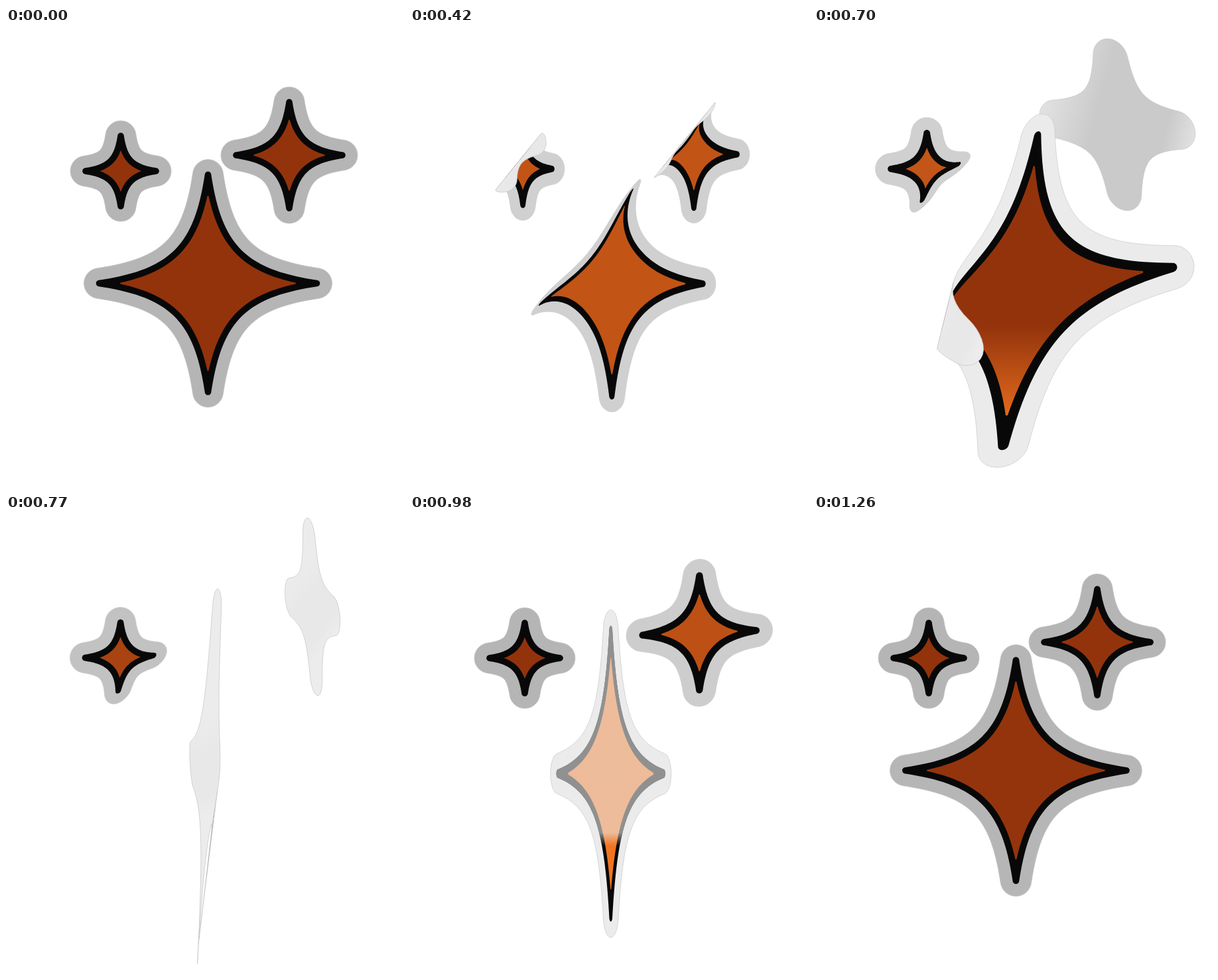
These frames come from a looping animation (600 by 693 pixels, 1330 ms). An HTML page with a canvas:

```html
<!DOCTYPE html>
<html lang="en">
<head>
<meta charset="utf-8">
<title>Sparkle stickers</title>
<style>
html, body { margin: 0; width: 100%; height: 100%; overflow: hidden; background: #fff; }
canvas { display: block; width: 600px; height: 693px; }
</style>
</head>
<body>
<canvas id="stage" width="600" height="693"></canvas>
<script>
const ctx = document.getElementById('stage').getContext('2d');
const STEP = 70, STEPS = 19, RIM = 23, INK = 4.8;
const EYE = { x: 310, y: 370 };
const lerp = (a, b, t) => a + (b - a) * t;
const clamp = v => Math.min(1, Math.max(0, v));
const grey = v => `rgb(${v},${v},${v})`;
const orange = l => `rgb(${147 + 47 * l},${51 + 33 * l},${12 + 10 * l})`;

// Keys: turn in revolutions about the upright axis, peel of a corner,
// curl of the left (+) or right (-) tip, tilt, lean and twist of the sheet.
const stars = [
  { x: 173, y: 216, size: 76, lift: 0.1, peak: 8, spread: 1.6, land: 13.2,
    keys: [
      { at: 0 },
      { at: 4, peel: 0.2 },
      { at: 6, turn: 0.1, peel: 0.45 },
      { at: 8, turn: 0.5, tilt: 0.15, curl: 0.9 },
      { at: 10, turn: 1, peel: -0.18 },
      { at: 12, turn: 1 }
    ] },
  { x: 427, y: 192, size: 103, lift: 0.3, peak: 11, spread: 2.6, land: 17,
    keys: [
      { at: 0 },
      { at: 4, peel: 0.02 },
      { at: 6, turn: 0.1, peel: 0.3 },
      { at: 8, turn: 0.4, tilt: 0.13, lean: -0.07, twist: 0.12, curl: -0.45 },
      { at: 10, turn: 0.57, tilt: 0.08, lean: 0.1 },
      { at: 12, turn: 0.83, tilt: 0.18 },
      { at: 14, turn: 0.98, tilt: 0.04 },
      { at: 16, turn: 1 }
    ] },
  { x: 304.5, y: 385.5, size: 187, lift: 0.53, peak: 11.6, spread: 3.4, land: 18.5,
    keys: [
      { at: 0 },
      { at: 4, peel: 0.015 },
      { at: 6, turn: 0.1, peel: 0.2 },
      { at: 8, turn: 0.647, tilt: 0.37, lean: -0.18, twist: 0.5, curl: -0.92 },
      { at: 10, turn: 1.03, tilt: 0.15, lean: -0.11, twist: 0.22, curl: 0.82 },
      { at: 12, turn: 1.5, curl: 0.3 },
      { at: 14, turn: 1.81 },
      { at: 16, turn: 1.98 },
      { at: 17, turn: 2 }
    ] }
];

// Four-pointed star of tip radius r, offset by d; result is divided by size.
function outline(r, d, size) {
  const base = [], pts = [], n = 40, a = 0.1, b = 0.33;
  const bez = (p, q, s, e, t) => {
    const u = 1 - t;
    return u * u * u * p + 3 * u * u * t * q + 3 * u * t * t * s + t * t * t * e;
  };
  const slope = (p, q, s, e, t) => (1 - t) ** 2 * (q - p) + 2 * (1 - t) * t * (s - q) + t * t * (e - s);
  const turn = ([x, y], q) => {
    for (; q > 0; q--) [x, y] = [-y, x];
    return [x, y];
  };
  for (let q = 0; q < 4; q++) {
    for (let i = 0; i <= n; i++) {
      const t = i / n;
      const x = r * bez(0, a, b, 1, t), y = r * bez(-1, -b, -a, 0, t);
      const tx = slope(0, a, b, 1, t), ty = slope(-1, -b, -a, 0, t), m = Math.hypot(tx, ty);
      const px = x + d * ty / m, py = y - d * tx / m;
      base.push(turn([x, y], q));
      if (d > 0 || (px > 0 && py < 0)) pts.push(turn([px, py], q));
    }
    if (d > 0) {
      const phi = Math.atan2(1 - b, a);
      for (let i = 1; i < 14; i++) {
        const w = lerp(-phi, phi, i / 14);
        pts.push(turn([r + d * Math.cos(w), d * Math.sin(w)], q));
      }
    }
  }
  const clear = p => d < 0 || base.every(o => Math.hypot(p[0] - o[0], p[1] - o[1]) >= d * 0.985);
  return pts.filter(clear).map(p => [p[0] / size, p[1] / size]);
}

for (const s of stars) {
  const r = s.size - RIM;
  s.body = outline(r, RIM, s.size);
  s.ink = outline(r, INK, s.size);
  s.core = outline(r, -INK, s.size);
}

// Keeps the part of a polygon where f is positive.
function cut(poly, f) {
  const out = [];
  poly.forEach((p, i) => {
    const q = poly[(i + 1) % poly.length], u = f(p), v = f(q);
    if (u >= 0) out.push(p);
    if (u >= 0 !== v >= 0) {
      const t = u / (u - v);
      out.push([lerp(p[0], q[0], t), lerp(p[1], q[1], t)]);
    }
  });
  return out;
}

function poseAt(keys, f) {
  const i = keys.findIndex(k => k.at > f);
  const q = keys[i < 0 ? keys.length - 1 : i], p = i < 0 ? q : keys[i - 1];
  const t = i < 0 ? 0 : (f - p.at) / (q.at - p.at), pose = {};
  for (const k of ['turn', 'peel', 'curl', 'tilt', 'lean', 'twist']) pose[k] = lerp(p[k] || 0, q[k] || 0, t);
  return pose;
}

// Bent sheet: maps star units to the stage and tells which side is seen.
function sheet(star, pose, f) {
  const { peel, curl, tilt, lean, twist } = pose;
  const zoom = 1 + star.lift * Math.exp(-(((f - star.peak) / star.spread) ** 2));
  const scale = star.size * zoom, swing = 0.7 * twist * twist * scale;
  const cx = lerp(EYE.x, star.x, zoom) + swing, cy = lerp(EYE.y, star.y, zoom) + swing / 2;
  const wide = Math.cos(pose.turn * 2 * Math.PI);
  const side = Math.sign(curl), corner = Math.sign(peel), droop = Math.abs(curl) / 2;

  const at = ([x, y]) => {
    const bend = Math.abs(curl) * Math.max(0, -x * side) ** 3;
    const push = peel * Math.max(0, -(x + y) * corner) ** 2;
    const u = x + bend * side, v = y + bend * droop;
    return [cx + scale * (wide * u + lean * v + twist * x * y + push),
            cy + scale * (v - tilt * u + push)];
  };
  const facing = ([x, y]) => {
    const e = 1e-3, o = at([x, y]), p = at([x + e, y]), q = at([x, y + e]);
    return (p[0] - o[0]) * (q[1] - o[1]) - (p[1] - o[1]) * (q[0] - o[0]);
  };
  return { at, facing, wide };
}

function fill(pts, paint, edge) {
  if (pts.length < 3) return;
  ctx.beginPath();
  for (const [x, y] of pts) ctx.lineTo(x, y);
  ctx.closePath();
  ctx.fillStyle = paint;
  ctx.fill();
  if (edge) {
    ctx.strokeStyle = edge;
    ctx.lineWidth = 0.8;
    ctx.stroke();
  }
}

function range(pts, k) {
  const v = pts.map(p => p[k]);
  return [Math.min(...v), Math.max(...v)];
}

function ramp(x0, y0, x1, y1, stops) {
  const g = ctx.createLinearGradient(x0, y0, x1, y1);
  for (const [o, c] of stops) g.addColorStop(o, c);
  return g;
}

function drawStar(star, f) {
  const pose = poseAt(star.keys, f);
  const { at, facing, wide } = sheet(star, pose, f);
  const front = poly => cut(poly, facing);
  const show = (poly, paint, edge) => fill(poly.map(at), paint, edge);
  const body = front(star.body);

  // Light is strongest in flight and fades towards landing; a curl shades the top.
  const light = 2 * clamp((f - 4) / 4) * clamp(Math.max(0, star.land - f) / 4.5) ** 2;
  const top = light * clamp(1 - 1.25 * Math.abs(pose.curl));

  if (body.length > 2) {
    const [y0, y1] = range(body.map(at), 1);
    const ink = front(star.ink), rim = 181 + 27 * light, haze = 0.6 * Math.max(0, top - 1);
    show(body, grey(rim), grey(Math.min(rim + 10, 205)));
    show(ink, grey(8));
    show(front(star.core), ramp(0, y0, 0, y1, [[0, orange(top)], [0.6, orange(top)], [0.9, orange(light)]]));
    if (haze > 0) {
      const veil = `rgba(235,235,235,${haze})`;
      show(ink, ramp(0, y0, 0, y1, [[0, veil], [0.68, veil], [0.72, 'rgba(235,235,235,0)']]));
    }
  }

  const back = cut(star.body, p => -facing(p)).map(at);
  if (back.length > 2) {
    const [x0, x1] = range(back, 0), [y0, y1] = range(back, 1);
    const mid = 232 - 55 * Math.max(0, -wide) ** 6, side = Math.min(236, mid + 25);
    const tilt = (y1 - y0) * 0.12, my = (y0 + y1) / 2;
    fill(back, ramp(x0, my - tilt, x1, my + tilt,
      [[0, grey(side)], [0.36, grey(mid)], [0.8, grey(mid)], [1, grey(side)]]), grey(200));
  }
}

function draw(now) {
  const f = Math.floor(now / STEP) % STEPS;
  ctx.fillStyle = '#fff';
  ctx.fillRect(0, 0, 600, 693);
  for (const s of stars) drawStar(s, f);
  requestAnimationFrame(() => draw(performance.now()));
}
draw(0);
</script>
</body>
</html>
```
